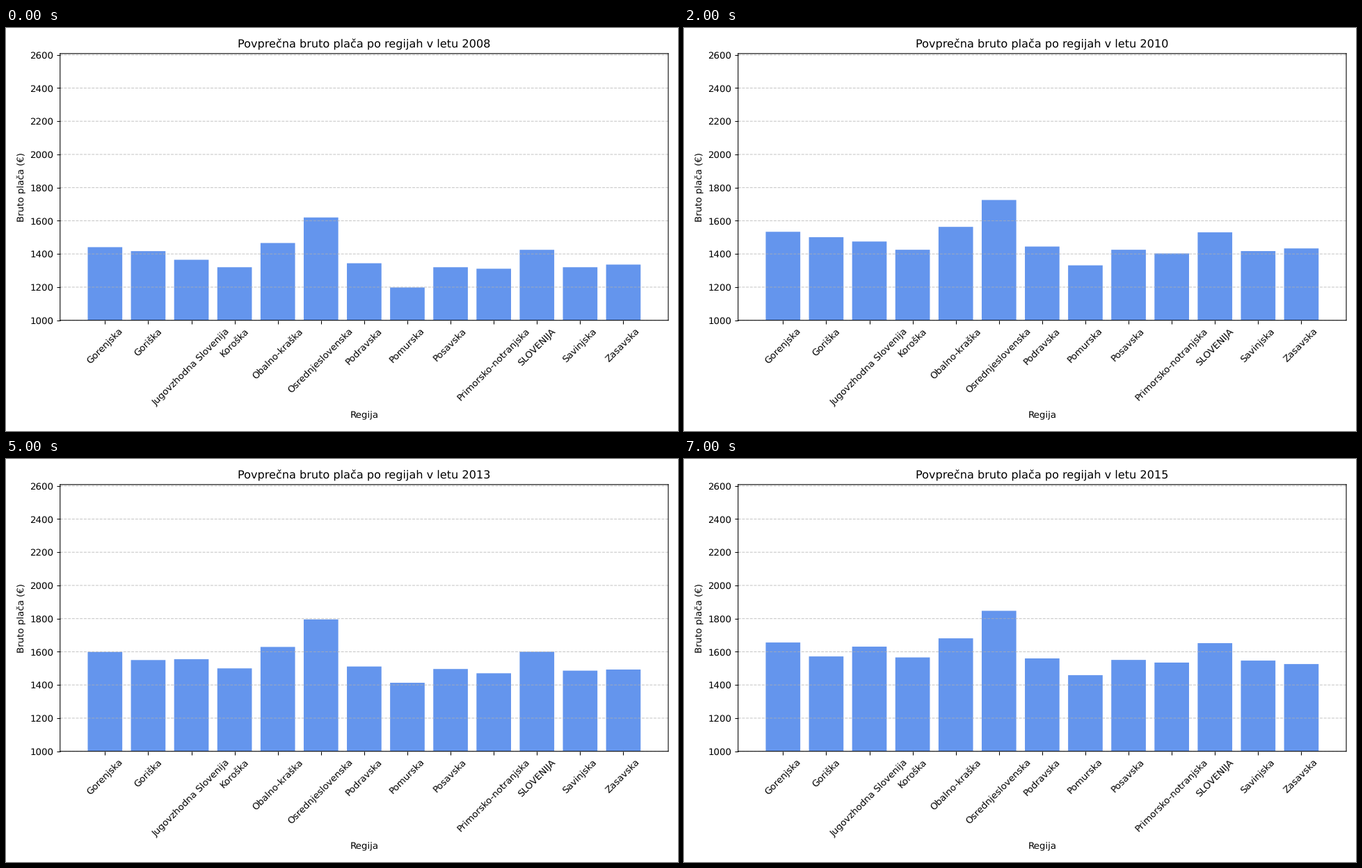
Recreate the animation shown at these times as a matplotlib script. Size 966 px wide and 580 px high, loop 8 s.

```python
import matplotlib.pyplot as plt
from matplotlib.animation import FuncAnimation

W, H, DPI = 966, 580, 96.6
LEFT, RIGHT, TOP, BOTTOM = 77.75, 952, 36.8, 420.7
START, TURN, END = 2008, 2011, 2015

# Gross pay per region in the START, TURN and END years
PAY = {
    "Gorenjska": (1441, 1580, 1656),
    "Goriška": (1417, 1543, 1572),
    "Jugovzhodna Slovenija": (1365, 1530, 1631),
    "Koroška": (1320, 1478, 1566),
    "Obalno-kraška": (1466, 1612, 1681),
    "Osrednjeslovenska": (1620, 1778, 1847),
    "Podravska": (1344, 1495, 1560),
    "Pomurska": (1198, 1398, 1459),
    "Posavska": (1320, 1478, 1551),
    "Primorsko-notranjska": (1311, 1449, 1535),
    "SLOVENIJA": (1425, 1583, 1652),
    "Savinjska": (1320, 1466, 1547),
    "Zasavska": (1336, 1482, 1526),
}


def pay_in(year, start, turn, end):
    """Steady growth up to TURN, then a slow recovery that speeds up."""
    if year <= TURN:
        return start + (turn - start) * (year - START) / (TURN - START)
    return turn + (end - turn) * ((year - TURN) / (END - TURN)) ** 2


# Smooth sub-pixel edges and letter shapes
plt.rcParams.update({
    "font.family": "DejaVu Sans",
    "path.snap": False,
    "text.hinting": "none",
})

fig = plt.figure(figsize=((W + 0.01) / DPI, (H + 0.01) / DPI), dpi=DPI)
ax = fig.add_axes([LEFT / W, 1 - BOTTOM / H,
                   (RIGHT - LEFT) / W, (BOTTOM - TOP) / H])

bars = ax.bar(list(PAY), [keys[0] for keys in PAY.values()],
              color="cornflowerblue")
ax.set_ylim(1000, 2608)
ax.set_xlabel("Regija")
ax.set_ylabel("Bruto plača (€)")
ax.tick_params(axis="x", rotation=45)
ax.grid(axis="y", linestyle="--", alpha=0.7)
title = ax.set_title("")


def draw_year(i):
    year = START + i
    for bar, keys in zip(bars, PAY.values()):
        bar.set_height(pay_in(year, *keys))
    title.set_text(f"Povprečna bruto plača po regijah v letu {year}")
    return [*bars, title]


anim = FuncAnimation(fig, draw_year, frames=END - START + 1, interval=1000,
                     repeat=True, repeat_delay=0)
plt.show()
```
